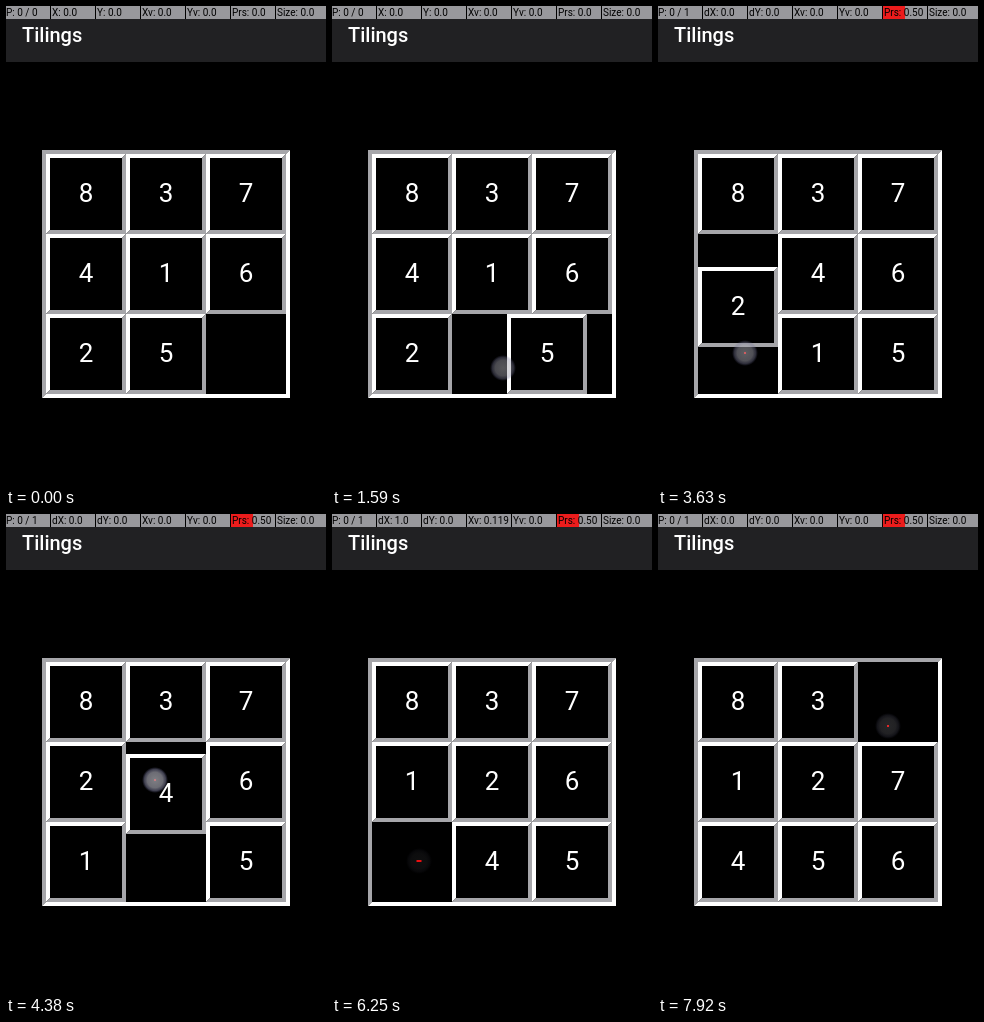
Animation of 320 by 480 pixels, one loop 8 s. Source, as an HTML page:

```html
<!DOCTYPE html>
<html lang="en">
<head>
<meta charset="utf-8">
<title>Tilings</title>
<style>
  html, body { margin: 0; width: 100%; height: 100%; overflow: hidden; background: #000; }
  svg { display: block; width: 320px; height: 480px; }
  text { font-family: Roboto, sans-serif; white-space: pre; }
  .title { font-size: 20px; font-weight: 500; fill: #fff; }
  .num { font-size: 26px; fill: #fff; text-anchor: middle; }
  .info { font-size: 10px; fill: #000; }
  .light { fill: #fff; }
  .shade { fill: #a6a6aa; }
</style>
</head>
<body>
<svg id="stage" viewBox="0 0 320 480">
  <defs>
    <radialGradient id="glow">
      <stop offset="0" stop-color="#b4b4bc" stop-opacity=".85"/>
      <stop offset=".6" stop-color="#a4a4b0" stop-opacity=".8"/>
      <stop offset=".82" stop-color="#8080a0" stop-opacity=".6"/>
      <stop offset="1" stop-color="#606090" stop-opacity="0"/>
    </radialGradient>
  </defs>
  <rect width="320" height="480"/>
  <rect y="13" width="320" height="43" fill="#212123"/>
  <text class="title" x="16" y="36">Tilings</text>
  <g id="board"></g>
  <g id="bar"></g>
  <path id="lines" fill="none" stroke="#0000c0" shape-rendering="crispEdges"/>
  <rect id="dot" height="2" fill="#f00000"/>
  <g id="spot">
    <circle r="13" fill="url(#glow)"/>
    <g id="press">
      <circle r="9.5" fill="#a8a8b0" fill-opacity=".75"/>
      <circle r="4.5" fill="none" stroke="#f4f4f4" stroke-width="1.2"/>
      <path d="M0-20V20" stroke="#58b030" stroke-width="1.2"/>
    </g>
  </g>
</svg>
<script>
const LOOP = 8000, SLIDE = 200, FADE = 290, CELL = 80;
const FIRST_INFO = 1700; // the info bar notices the first tap late
const NS = "http://www.w3.org/2000/svg";
const $ = id => document.getElementById(id);

const start = [[8, 3, 7], [4, 1, 6], [2, 5]];

// tile, columns, rows, slide start, tap x, tap y, hold time, sideways drift
const taps = [
  [5, 1, 0, 1466, 171, 362, 0, 0],
  [1, 0, 1, 2520, 160, 280, 60, 0],
  [4, 1, 0, 3070, 98, 274, 70, 0],
  [2, 0, -1, 3520, 87, 347, 60, 0],
  [1, -1, 0, 3960, 156, 351, 0, 0],
  [4, 0, 1, 4330, 149, 266, 0, 0],
  [2, 1, 0, 5000, 88, 274, 0, 0],
  [1, 0, -1, 5990, 87, 347, 40, 1],
  [4, -1, 0, 6310, 156, 351, 20, 0],
  [5, -1, 0, 6745, 229, 351, 0, 0],
  [6, 0, 1, 7210, 230, 282, 0, 0],
  [7, 0, 1, 7705, 230, 212, 0, 0]
].map(([tile, dx, dy, at, x, y, hold, drift]) => ({ tile, dx, dy, at, x, y, hold, drift }));

function add(parent, name, attrs, text) {
  const el = document.createElementNS(NS, name);
  for (const key in attrs) el.setAttribute(key, attrs[key]);
  if (text !== undefined) el.textContent = text;
  return parent.appendChild(el);
}

// Mitred square edge, 4 px wide
function bevel(parent, s, topLeft, bottomRight) {
  const i = s - 4;
  add(parent, "path", { class: topLeft, d: `M0 0H${s}L${i} 4H4V${i}L0 ${s}Z` });
  add(parent, "path", { class: bottomRight, d: `M${s} ${s}H0L4 ${i}H${i}V4L${s} 0Z` });
}

const board = $("board"), bar = $("bar");
bevel(add(board, "g", { transform: "translate(36 144)" }), 248, "shade", "light");

const tiles = [];
start.forEach((row, r) => row.forEach((n, c) => {
  const g = add(board, "g", {});
  add(g, "rect", { width: CELL, height: CELL });
  bevel(g, CELL, "light", "shade");
  add(g, "text", { class: "num", x: 40, y: 48 }, n);
  tiles.push({ n, g, x: 40 + c * CELL, y: 148 + r * CELL });
}));

add(bar, "rect", { width: 320, height: 13, fill: "#98989c" });
const red = add(bar, "rect", { x: 224, width: 23, height: 13, fill: "#ec1c1c" });
const info = [];
for (let i = 0; i < 7; i++) {
  const x = i * 45;
  if (i) add(bar, "rect", { x: x - 1, width: 1, height: 13 });
  info.push(add(bar, "text", { class: "info", x: x + (i ? 1 : 0), y: 10 }));
}

const clamp = v => Math.min(1, Math.max(0, v));
const ease = v => (1 - Math.cos(Math.PI * clamp(v))) / 2;
const show = (el, on) => el.setAttribute("visibility", on ? "visible" : "hidden");

function drawTiles(t) {
  for (const { n, g, x, y } of tiles) {
    let px = x, py = y;
    for (const m of taps) {
      if (m.tile !== n) continue;
      const k = ease((t - m.at) / SLIDE) * CELL;
      px += m.dx * k;
      py += m.dy * k;
    }
    g.setAttribute("transform", `translate(${Math.round(px)} ${Math.round(py)})`);
  }
}

function drawInfo(t, tap, held) {
  const used = t >= FIRST_INFO;
  const drift = used && !held ? tap.drift : 0;
  const place = (axis, pos, moved) =>
    !used ? `${axis}: 0.0` : held ? `${axis}: ${pos.toFixed(1)}` : `d${axis}: ${moved.toFixed(1)}`;
  const words = [
    `P: ${held ? 1 : 0} / ${used ? 1 : 0}`,
    place("X", tap?.x, drift),
    place("Y", tap?.y, 0),
    drift ? "Xv: 0.119" : "Xv: 0.0",
    "Yv: 0.0",
    used ? "Prs: 0.50" : "Prs: 0.0",
    "Size: 0.0"
  ];
  words.forEach((w, i) => { if (info[i].textContent !== w) info[i].textContent = w; });
  show(red, used);
  // the labels start soft and sharpen
  const soft = 1 - clamp(t / 840);
  info.forEach(el => el.style.filter = soft ? `blur(${(soft * 0.6).toFixed(2)}px)` : "none");
}

function drawTouch(t, tap, held) {
  const alpha = !tap ? 0 : held ? 1 : 1 - clamp((t - tap.at) / FADE);
  show($("lines"), held);
  show($("press"), held);
  show($("dot"), tap && !held && t >= FIRST_INFO);
  $("spot").setAttribute("opacity", alpha);
  if (!tap) return;
  const { x, y } = tap, wide = 2 + 3 * tap.drift;
  $("spot").setAttribute("transform", `translate(${x} ${y})`);
  $("lines").setAttribute("d", `M${x + 0.5} 0V480M0 ${y + 0.5}H320`);
  $("dot").setAttribute("x", x - wide / 2);
  $("dot").setAttribute("y", y - 1);
  $("dot").setAttribute("width", wide);
}

let origin;
function draw(now) {
  origin ??= now;
  const t = Math.max(0, now - origin) % LOOP;
  const tap = taps.filter(m => t >= m.at - m.hold).pop();
  const held = !!tap && t < tap.at;
  drawTiles(t);
  drawInfo(t, tap, held);
  drawTouch(t, tap, held);
  requestAnimationFrame(draw);
}
draw(performance.now());
</script>
</body>
</html>
```
